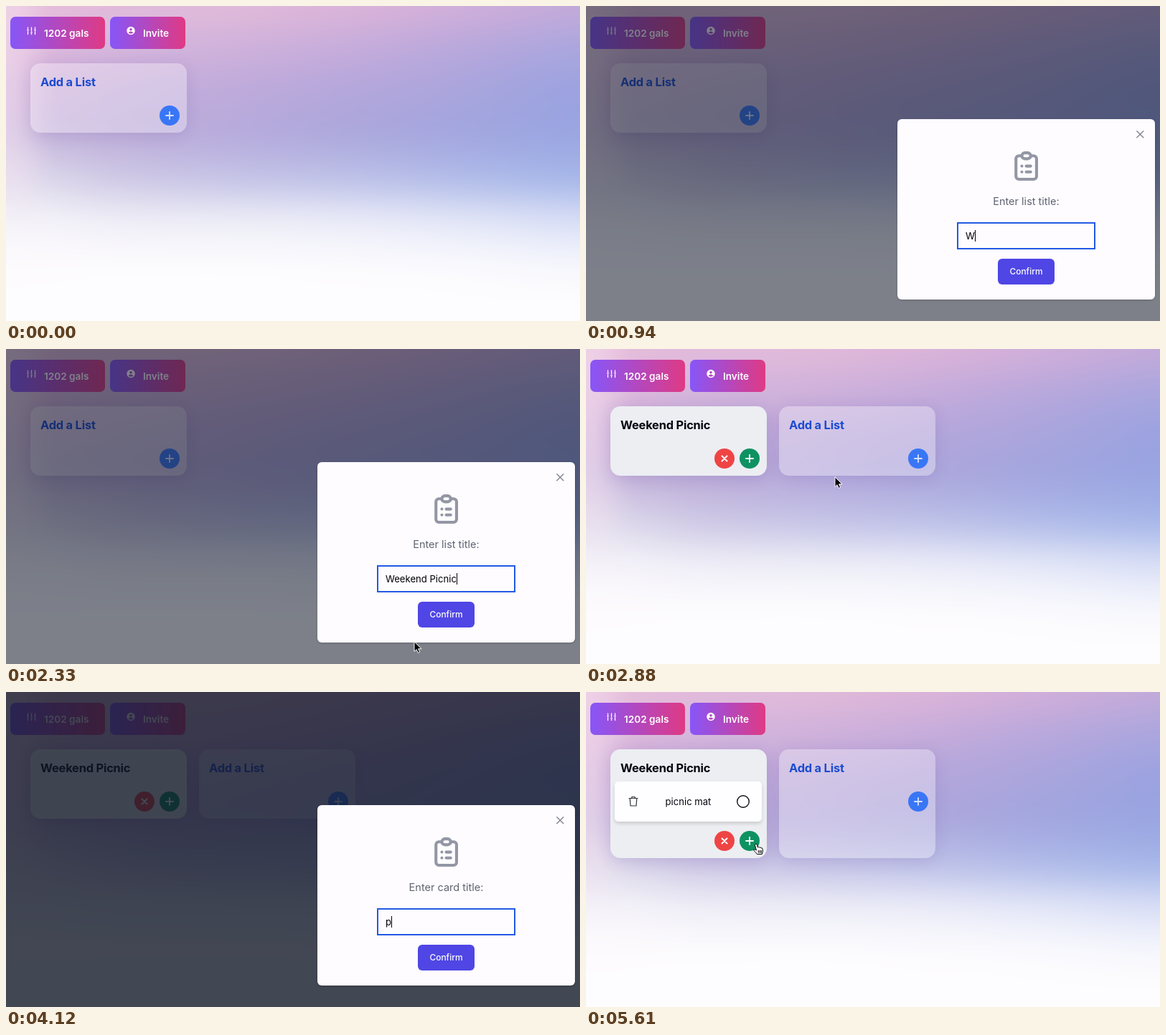
These frames come from a looping animation (800x440 px, 5.64 s). An HTML page with a canvas:

```html
<!DOCTYPE html>
<html lang="en">
<head>
<meta charset="utf-8">
<title>Shared lists</title>
<style>
html, body { margin: 0; width: 800px; height: 440px; overflow: hidden; background: #fdfcfe; }
#stage { position: relative; width: 800px; height: 440px; overflow: hidden; font-family: Inter, "Open Sans", sans-serif; }
#stage div, #stage span, #stage svg, canvas { position: absolute; box-sizing: border-box; }
#stage span { white-space: pre; line-height: 20px; }
svg { overflow: visible; fill: none; stroke-linecap: round; stroke-linejoin: round; }
.pill { top: 15px; height: 45px; border-radius: 7px; background: linear-gradient(90deg, #8756f8, #df3a84); color: #fff; font-size: 13.6px; font-weight: 600; }
.pill span { top: 13px; }
.list { top: 80px; width: 218px; height: 97px; border-radius: 14px; }
.list .title { left: 14px; top: 16px; font-size: 16.4px; font-weight: 700; letter-spacing: -.012em; }
.add { background: rgba(255,255,255,.3); color: #1b4bd0; box-shadow: 0 4px 22px rgba(70,40,140,.13); }
.full { left: 34px; background: #eceef2; color: #060610; box-shadow: 0 4px 22px rgba(70,40,140,.16); }
.dot { width: 28px; height: 28px; border-radius: 50%; }
.dot svg { left: 0; top: 0; }
#item { left: 6px; top: 45px; width: 205px; height: 56px; border-radius: 5px; background: #fefdff; box-shadow: 0 3px 5px rgba(0,0,0,.14); }
#item span { left: 0; width: 100%; top: 18px; text-align: center; font-size: 13.1px; }
#shade { inset: 0; }
#modal { left: 434px; top: 158px; width: 359px; height: 252px; border-radius: 6px; background: #fefcff; box-shadow: 0 1px 3px rgba(0,0,0,.2); }
#label { left: 0; width: 100%; top: 105px; text-align: center; font-size: 14.5px; color: #5f6472; }
#field { left: 83px; top: 144px; width: 193px; height: 38px; }
#text { left: 95px; top: 153px; font-size: 13.1px; color: #000; }
#caret { position: static !important; display: inline-block; width: 1px; height: 16px; background: #000; vertical-align: -3px; }
#ok { left: 140px; top: 195px; width: 79px; height: 36px; border-radius: 6px; }
#ok span { left: 0; width: 100%; top: 8px; text-align: center; font-size: 11.9px; font-weight: 500; color: #fff; }
</style>
</head>
<body>
<div id="stage">
  <canvas id="bg" width="800" height="440" style="left:0;top:0"></canvas>

  <div class="pill" style="left:6px;width:132px">
    <svg style="left:23px;top:14px" width="13" height="12" stroke="#fff" stroke-width="1.3"><path d="M1.5 1v2M1.5 6.500v4M6.500 1v5M6.500 9.500v1M11.500 1v2M11.500 6.500v4M.6 4.700h1.800M5.600 7.800h1.800M10.600 4.700h1.800"/></svg>
    <span style="left:47px">1202 gals</span>
  </div>
  <div class="pill" style="left:145px;width:105px">
    <svg style="left:23px;top:13px" width="12" height="12"><circle cx="6" cy="6.500" r="5.700" fill="#fff"/><circle cx="6" cy="4.700" r="1.800" fill="#b449c5"/><path d="M2.500 9.300Q6 5.900 9.500 9.300Q6 12.200 2.500 9.300" fill="#b449c5"/></svg>
    <span style="left:46px">Invite</span>
  </div>

  <div class="list full" id="picnic">
    <span class="title">Weekend Picnic</span>
    <div id="item">
      <svg style="left:19px;top:20px" width="14" height="16" stroke="#30333d" stroke-width="1.2"><path d="M1 3.500h12M4.800 3.500v-2h4.400v2M2.200 3.500l.8 10.500h8l.8-10.500"/></svg>
      <span>picnic mat</span>
      <svg style="left:170px;top:19px" width="18" height="18" stroke="#111" stroke-width="1.4"><circle cx="9" cy="9" r="8.300"/></svg>
    </div>
    <div class="dot" style="left:145px;bottom:10px;background:#ef4444"><svg width="28" height="28" stroke="#fff" stroke-width="2"><path d="M10.500 10.500l7 7M17.500 10.500l-7 7"/></svg></div>
    <div class="dot" style="left:180px;bottom:10px;background:#0e9262"><svg width="28" height="28" stroke="#fff" stroke-width="2"><path d="M9 14h10M14 9v10"/></svg></div>
  </div>

  <div class="list add" id="adder">
    <span class="title">Add a List</span>
    <div class="dot" style="left:180px;top:59px;background:#3976f6"><svg width="28" height="28" stroke="#d8e1fb" stroke-width="1.800"><path d="M9 14h10M14 9v10"/></svg></div>
  </div>

  <div id="shade"></div>
  <div id="modal">
    <svg style="left:333px;top:15.500px" width="11" height="11" stroke="#858995" stroke-width="1.500"><path d="M.8.8l9 9M9.800.8l-9 9"/></svg>
    <svg style="left:155px;top:41px" width="49.200" height="49.200" viewBox="0 0 24 24" stroke="#9396a4" stroke-width="2"><path d="M9 5H7a2 2 0 0 0-2 2v12a2 2 0 0 0 2 2h10a2 2 0 0 0 2-2V7a2 2 0 0 0-2-2h-2M9 5a2 2 0 0 0 2 2h2a2 2 0 0 0 2-2M9 5a2 2 0 0 1 2-2h2a2 2 0 0 1 2 2M12 12h3M12 16h3M9 12h.01M9 16h.01"/></svg>
    <span id="label"></span>
    <div id="field"></div>
    <span id="text"><b id="typed" style="font-weight:400"></b><i id="caret"></i></span>
    <div id="ok"><span>Confirm</span></div>
  </div>

  <svg id="cursor" style="left:0;top:0" width="20" height="20">
    <path id="arrow" d="M0 0V13.500L3.100 10.700L5.200 15.400L7.600 14.300L5.500 9.800H9.700Z" fill="#000" stroke="#fff" stroke-width="1"/>
    <path id="hand" d="M-1.500 1.200Q0-.8 1.300 1.200L2.300 5Q3.700 3.800 4.600 5.200Q6 4.300 6.900 5.800Q8.800 5.300 9.100 7.300Q9.900 11 8.200 14.500H1.400Q-.4 11.600-3.300 9.300Q-3.600 7.300-1.200 8L.1 8.900ZM3.300 9.500v3M5.300 9.500v3M7.200 9.500v3" fill="#fff" stroke="#000" stroke-width="1"/>
    <path id="beam" d="M-2-7Q0-7 0-5.500Q0-7 2-7M0-5.500V5.500M-2 7Q0 7 0 5.500Q0 7 2 7" stroke="#222" stroke-width="1"/>
  </svg>
</div>

<script>
const LOOP = 5640;
const $ = id => document.getElementById(id);
const clamp = v => Math.max(0, Math.min(1, v));
const smooth = v => v * v * (3 - 2 * v);
const show = (id, on) => { $(id).style.display = on ? "" : "none"; };

// Backdrop mesh: control colours 160 px apart across, 60 px apart down.
const MESH = [
  "e6bcdb e1badb dfb9da d9b3d9 ceaeda c1aada",
  "dfb9dc d4b5dc ceb1db c5acdb b8a8dc aba6de",
  "d2b4dc c6afdb beabdb b4a7db a9a5dd 9ca3e0",
  "ccbcdf c0b1db b8addd aeaadd a4a8e0 9ba7e2",
  "dfdbec d0cae6 c7c5e7 bfc2e8 b3bde9 a9b8e9",
  "f4f3f9 eeecf6 ebebf6 e8e9f7 e0e4f6 d7ddf5",
  "fcfafd fbfafd fbfafd faf9fd f8f8fd f4f5fc",
  "fdfcfe fdfcfe fdfcfe fdfcfe fdfcfe fdfcfe"
].map(row => row.split(" ").map(hex => [0, 2, 4].map(i => parseInt(hex.substr(i, 2), 16))));

function spline(at, pos, last) {
  const i = Math.min(last, Math.floor(pos)), f = pos - i;
  const p = k => at(Math.max(0, Math.min(last, i + k)));
  const a = p(-1), b = p(0), c = p(1), d = p(2);
  return b + .5 * f * (c - a + f * (2 * a - 5 * b + 4 * c - d + f * (3 * (b - c) + d - a)));
}

function paintBackdrop() {
  const ctx = $("bg").getContext("2d"), img = ctx.createImageData(800, 440);
  const edge = [246, 228, 241];
  for (let x = 0; x < 800; x++) {
    const cols = MESH.map(row => edge.map((_, c) => spline(i => row[i][c], x / 160, 5)));
    const fade = .5 * (1 - smooth(clamp(x / 75)));
    for (let y = 0; y < 440; y++) {
      const o = (y * 800 + x) * 4, k = fade * (1 - clamp((y - 220) / 120));
      for (let c = 0; c < 3; c++) {
        const v = spline(i => cols[i][c], Math.min(7, y / 60), 7);
        img.data[o + c] = v + (edge[c] - v) * k;
      }
      img.data[o + 3] = 255;
    }
  }
  ctx.putImageData(img, 0, 0);
}

const DIALOGS = [
  { open: 440, focus: 740, type: 930, step: 95, hover: 2390, blur: 2520, close: 2620, label: "Enter list title:", text: "Weekend Picnic", shade: .54 },
  { open: 3200, focus: 3680, type: 4105, step: 90, hover: 5060, blur: 5205, close: 5300, label: "Enter card title:", text: "picnic mat", shade: .79 }
];

// Pointer stops: time, x, y
const PATH = [
  [30, 340, 450], [250, 232, 156], [440, 232, 156], [720, 600, 325], [2180, 600, 325],
  [2330, 569, 409], [2460, 620, 380], [2600, 620, 380], [2880, 347, 179], [3050, 232, 156],
  [3200, 232, 156], [3620, 590, 324], [5000, 590, 324], [5120, 622, 381], [5290, 622, 381], [5600, 237, 212]
];

function pointerAt(t) {
  let i = 0;
  while (i < PATH.length - 2 && t >= PATH[i + 1][0]) i++;
  const a = PATH[i], b = PATH[i + 1], k = smooth(clamp((t - a[0]) / (b[0] - a[0])));
  return [a[1] + (b[1] - a[1]) * k, a[2] + (b[2] - a[2]) * k];
}

const inside = (x, y, l, t, r, b) => x >= l && x <= r && y >= t && y <= b;

function drawPointer(t, dialog, rowY) {
  const [x, y] = pointerAt(t);
  const typing = (t >= 900 && t < 2190) || (t >= 4080 && t < 5010);
  show("cursor", t >= 30 && !typing);
  $("cursor").style.transform = `translate(${x}px,${y}px)`;
  let kind = "arrow";
  if (dialog) {
    if (inside(x, y, 517, 302, 710, 340)) kind = "beam";
    else if (inside(x, y, 574, 353, 653, 389)) kind = "hand";
  } else if (inside(x, y, 214, rowY - 14, 242, rowY + 14)) kind = "hand";
  for (const id of ["arrow", "hand", "beam"]) show(id, id === kind);
}

function drawDialog(t, d) {
  show("shade", d);
  show("modal", d);
  if (!d) return;
  const focused = t >= d.focus && t < d.blur;
  const count = Math.max(0, Math.floor((t - d.type) / d.step) + 1);
  const k = clamp((t - d.hover) / 130);
  const mix = (a, b) => Math.round(a + (b - a) * k);
  $("shade").style.background = `rgba(17,24,39,${d.shade})`;
  $("label").textContent = d.label;
  $("typed").textContent = d.text.slice(0, count);
  $("field").style.border = focused ? "2px solid #2259e4" : "1px solid #6f7385";
  $("field").style.margin = focused ? "0" : "1px";
  $("field").style.width = focused ? "193px" : "191px";
  $("field").style.height = focused ? "38px" : "36px";
  show("caret", focused);
  $("ok").style.background = `rgb(${mix(79, 18)},${mix(70, 84)},${mix(229, 108)})`;
}

function draw(t) {
  const hasList = t >= DIALOGS[0].close, hasItem = t >= DIALOGS[1].close;
  const height = hasItem ? "152px" : "97px";
  const dialog = DIALOGS.find(d => t >= d.open && t < d.close);
  show("picnic", hasList);
  show("item", hasItem);
  $("picnic").style.height = $("adder").style.height = height;
  $("adder").style.left = hasList ? "269px" : "34px";
  drawDialog(t, dialog);
  drawPointer(t, dialog, hasItem ? 208 : 153);
}

paintBackdrop();
const start = performance.now();
function tick() {
  draw((performance.now() - start) % LOOP);
  requestAnimationFrame(tick);
}
tick();
</script>
</body>
</html>
```
